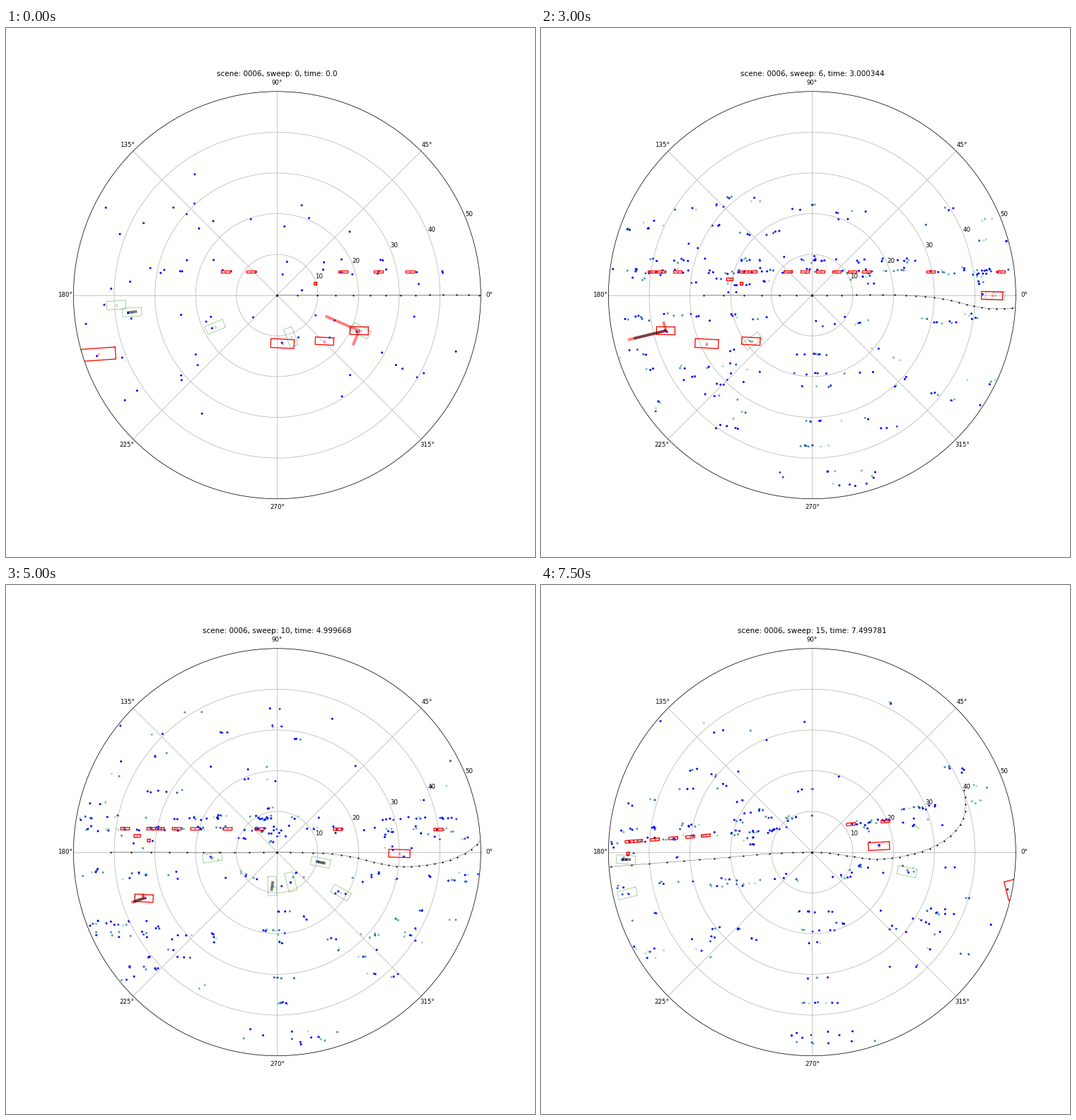
These frames come from a looping animation (748x748 px, 8000 ms). A matplotlib script:

```python
import numpy as np
import matplotlib.pyplot as plt
from matplotlib.animation import FuncAnimation

# World units are screen pixels at 5.76 px per metre; positions are complex numbers
SIZE, PX_PER_M, REACH = 748, 5.76, 288
SWEEPS, INTERVAL = 16, 500

# Timestamp drift in microseconds
DRIFT = np.interp(range(SWEEPS), [0, 2, 4, 6, 9, 12, 15],
                  [0, 312, 44, 344, -577, 159, -219])


def unit(deg):
    return np.exp(1j * np.radians(deg))


def heading(k):
    return np.interp(k, [0, 6, 9, 12, 15, 17, 19, 21, 23, 25, 28.4, 31.5, 33.3, 35.4, 37.6, 40],
                     [0, 0, .9, -1.3, -4.5, -11, -14.5, -13, -4.5, 3, 11.5, 26, 38, 58, 84, 98])


# Sensor path: one pose per half second
POSES = np.arange(41)
STEPS = np.interp(POSES[:-1], [0, 1, 2, 3, 6, 8, 11, 14, 17, 21, 31, 36],
                  [28.5, 28.5, 25.5, 25, 21, 20.5, 17, 13, 12, 10.5, 11.5, 10])
POS = np.append(0, np.cumsum(STEPS * unit(heading(POSES[:-1] + .5))))

# Vehicles: x over time in seconds, y, length, width, angle, last sweep
VEHICLES = [
    (lambda t: 7.5 - t, -68.5, 33, 12.5, -3, 8),
    (lambda t: 67 - 5 * max(0, t - 3) ** 2, -65, 26, 10.5, -3, 15),
    (lambda t: 116 - 56.5 * t, -50.3, 26, 11, -1, 15),
    (lambda t: 408, -.7, 30, 11, -1.5, 15),
    (lambda t: -252.5, -83.5, 48, 17, 4, 0),
    (lambda t: 596.5, -76, 28, 27, 10, 15),
]

# Row of parked two-wheelers and two people on foot
BIKES = np.array([-150, -124, -110, -73, -60, -37, 20, 57, 69, 93, 119, 143, 165,
                  188, 210, 230, 288, 321, 371, 420, 463]) + 33.3j
PEOPLE = [(53.5 + 16.5j, 4), (37 + 23j, 9)]

PALETTE = np.array(['#0000ff', '#2458c8', '#4a98b0', '#6cc0a8', '#a4e0c2'])
AGES = [.52, .12, .15, .11, .1]
ECHO_ROWS = [-84, -110.5, -128.5, -178, -213.5]


def scatter_in(rng, n, x0, x1, y0, y1):
    return rng.uniform(x0, x1, n) + 1j * rng.uniform(y0, y1, n)


# Static clutter as bands along the road: count, x range, y range
seed = np.random.default_rng(6)
CLUTTER = np.concatenate([scatter_in(seed, *band) for band in [
    (90, -180, 560, 47.5, 50.5), (85, -220, 520, 31, 36), (40, -290, 560, 5, 28),
    (65, -290, 560, -42, -26), (150, -290, 560, -140, -70),
    (45, -290, 560, -195, -140), (85, -290, 560, 60, 140),
    (25, -290, 560, 140, 215)]])

fig = plt.figure(figsize=(12, 12), dpi=SIZE / 12)
ax = fig.add_subplot(projection='polar')


def to_ego(z, i):
    return (z - POS[i]) * unit(-heading(i))


def polar(z):
    z = np.asarray(z)
    return np.angle(z), np.abs(z) / PX_PER_M


def line(z, *fmt, **style):
    ax.plot(*polar(z), *fmt, **style)


def box(z, length, width, deg, color='r', lw=1.5, alpha=1):
    corners = np.array([1 + 1j, -1 + 1j, -1 - 1j, 1 - 1j, 1 + 1j]) / 2
    shape = corners.real * length + 1j * corners.imag * width
    line(z + shape * unit(deg), color=color, lw=lw, alpha=alpha)
    line([z], 's', ms=min(3, width * .6), mfc='none', mew=.6, alpha=.7,
         mec='r' if color == 'r' else 'gray')


def stroke(z, color):
    line(z, color=color, lw=4.5, alpha=.5, solid_capstyle='butt')


def velocity(z, v):
    """Split a velocity into its radial and tangential arms."""
    ray = z / abs(z)
    radial = (v * ray.conjugate()).real * ray
    stroke([z + radial, z, z + v - radial], 'r')
    if radial.real * z.real > 0:
        stroke([z, z + .85 * radial], 'k')


def tracked(z, rng):
    """Tracker boxes point roughly along the line of sight."""
    deg = np.degrees(np.angle(z if z.real > 0 else -z))
    box(z, 27, 12, deg + rng.normal(0, 6), 'green', 1, .4)


def draw_vehicles(i, rng):
    centres = []
    for track, y, length, width, deg, last in VEHICLES:
        t = i * INTERVAL / 1000
        z = to_ego(track(t) + 1j * y, i)
        if i > last or abs(z) > REACH + length / 2:
            continue
        box(z, length, width, deg - heading(i))
        speed = (track(t + .01) - track(t - .01)) / .02
        if abs(speed) > 5:
            velocity(z, speed * unit(-heading(i)))
        if rng.random() < .3:
            tracked(z + rng.normal(0, 4), rng)
        centres.append(z)
    return centres


def draw_boxes(i, rng):
    """Draw all annotations of a sweep and return their centres."""
    centres = draw_vehicles(i, rng)
    bikes = to_ego(BIKES, i)
    bikes = bikes[(abs(bikes) < 275) & (rng.random(len(bikes)) < .55)]
    for z in bikes:
        box(z, 12.5, 3.5, -heading(i))
    for z, size in PEOPLE:
        z = to_ego(z, i)
        if z.real < 0 and abs(z) < 240 or size < 5:
            box(z, size, 4, -heading(i))
    for z in scatter_in(rng, rng.integers(0, 6), -265, 190, -60, -5):
        tracked(z, rng)
        if rng.random() < .3:
            stroke(z + np.array([-7, 7]) * z / abs(z), 'k')
        centres.append(z)
    return [*centres, *bikes]


def draw_radar(i, centres, rng):
    z = to_ego(CLUTTER, i)
    chance = np.where(z.real < 0, .5, .4)
    chance[(z.real > 0) & (z.imag > 55)] = .2
    chance[(abs(z.real) < 75) & (z.imag < -40)] = .04
    z = np.append(z[rng.random(len(z)) < chance * (.5 if i == 0 else 1)], centres)
    # The history of past returns builds up after the first sweep
    z = np.repeat(z, rng.integers(1, 4 if i else 2, len(z)))
    z = z + rng.normal(0, 6, len(z)) + 1j * rng.normal(0, 1.6, len(z))
    if i > 2:
        for y in ECHO_ROWS:
            n = rng.integers(3, 10)
            z = np.append(z, rng.normal(5, 14, n) + 1j * rng.normal(y, .7, n))
        z = np.append(z, scatter_in(rng, 14, -50, 90, -272, -248))
    z = z[(abs(z) < REACH - 2) & (z.imag > (-170 if i < 2 else -REACH))]
    age = rng.choice(5, len(z), p=AGES) * (i > 0)
    order = np.argsort(-age)
    ax.scatter(*polar(z[order]), s=12, c=PALETTE[age[order]], linewidths=0)


def draw(i):
    rng = np.random.default_rng(100 + i)
    ax.clear()
    ax.set_rlim(0, 50)
    ax.set_rticks(range(10, 60, 10))
    time = f'{i * INTERVAL / 1000 + DRIFT[i] * 1e-6:.6f}' if i else '0.0'
    ax.set_title(f'scene: 0006, sweep: {i}, time: {time}')
    line(to_ego(POS, i), 'k.-', lw=.35, ms=3)
    line([0], 'k.', ms=5)
    draw_radar(i, draw_boxes(i, rng), rng)
    return []


anim = FuncAnimation(fig, draw, frames=SWEEPS, interval=INTERVAL, repeat=True)
plt.show()
```
